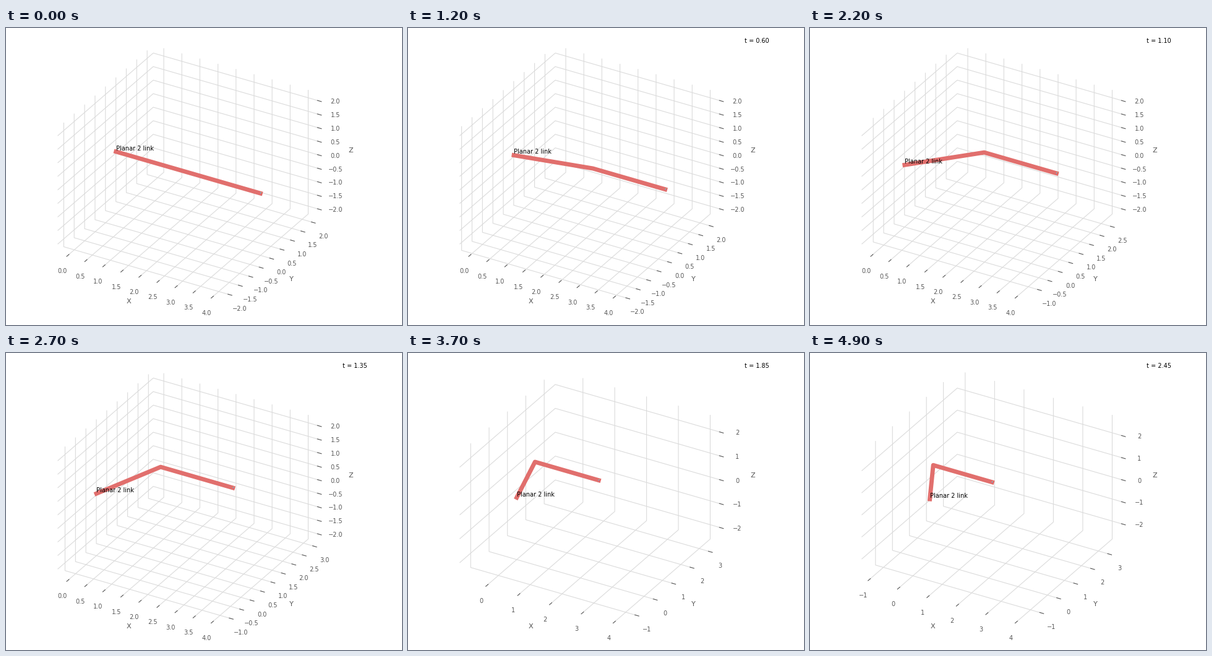
A matplotlib script for the animation above (5000 ms loop, 640 px wide and 480 px high).

```python
import math

import matplotlib.pyplot as plt
import numpy as np
from matplotlib.animation import FuncAnimation
from matplotlib.collections import LineCollection

W, H, DPI = 640, 480, 100
FRAMES, INTERVAL = 50, 100
LINK = 2.0               # length of each arm segment
FINAL_ANGLE = 2.044      # shoulder angle at the end, radians
GREY, GRID, ARM = "#555555", "#dbdbdb", "#E16F6D"

CENTRE = np.array([294.49, 233.51])
CUBE = 296.53            # pixels spanned by one full axis range
EDGE = 0.5 * 25 / 24     # panes reach slightly past the limits
# Orthographic view, elevation 30 and azimuth -60; z is squeezed to 3/4.
VIEW = CUBE * np.array([
    [math.sqrt(3) / 2, 0.25],
    [0.5, -math.sqrt(3) / 4],
    [0, -0.75 * math.sqrt(3) / 2],
])

# For each axis: the edge holding its ticks, the tick direction, and the grid path.
EDGES = np.array([[0, -1, -1], [1, 0, -1], [1, 1, 0]])
TICK_DIRS = np.array([[0, -1, 0], [1, 0, 0], [1, 0, 0]])
GRID_PATHS = np.array([
    [[0, -1, -1], [0, 1, -1], [0, 1, 1]],
    [[1, 0, -1], [-1, 0, -1], [-1, 0, 1]],
    [[-1, -1, 0], [-1, 1, 0], [1, 1, 0]],
])
TICK_PAD = 11.5 * 48 / 691.2 / 12
LABEL_PAD = 22 * 48 / 691.2 / 12

plt.rcParams["font.family"] = "DejaVu Sans"
fig = plt.figure(figsize=(W / DPI, H / DPI), dpi=DPI, facecolor="white")
ax = fig.add_axes([0, 0, 1, 1])


def project(points):
    """Map points in units of the axis range, centred on the box, to pixels."""
    return CENTRE + np.asarray(points, dtype=float) @ VIEW


def shoulder_angle(frame):
    t = frame / (FRAMES - 1)
    return FINAL_ANGLE * t**3 * (10 - 15 * t + 6 * t * t)


def view_box(angle):
    """Centre and range of the limits around everything swept so far."""
    x_min = LINK * min(0.0, math.cos(angle))
    y_max = LINK * math.sin(min(angle, math.pi / 2))
    x_max = 2 * LINK
    middle = np.array([(x_min + x_max) / 2, y_max / 2, 0.0])
    return middle, 1.1 * (x_max - x_min)


def tick_values(middle, span):
    step = 0.5 if span <= 4.5 else 1
    first = math.ceil((middle - span / 2) / step)
    last = math.floor((middle + span / 2) / step)
    digits = 1 if step < 1 else 0
    for k in range(first, last + 1):
        yield k * step, f"{k * step:.{digits}f}".replace("-", "\u2212")


def draw_axis(index, middle, span):
    edge = EDGES[index]
    along = np.eye(3)[index]
    grid_lines = []
    for value, text in tick_values(middle[index], span):
        offset = along * (value - middle[index]) / span
        grid_lines.append(project(GRID_PATHS[index] * EDGE + offset))
        base = edge * EDGE + offset
        tick = project([base - TICK_DIRS[index] * 0.1 / 12,
                        base + TICK_DIRS[index] * 0.2 / 12])
        ax.plot(*tick.T, color=GREY, lw=0.8, zorder=2)
        ax.text(*project(base + edge * TICK_PAD), text, color=GREY,
                size=7, ha="center", va="top")
    ax.add_collection(LineCollection(grid_lines, colors=GRID, linewidths=0.8,
                                     zorder=1), autolim=False)
    ax.text(*project(edge * (EDGE + LABEL_PAD)), "XYZ"[index], color=GREY,
            size=8, ha="center", va="center")


def draw_arm(angle, middle, span):
    def place(points):
        return project((np.asarray(points) - middle) / span)

    elbow = LINK * np.array([math.cos(angle), math.sin(angle), 0])
    tip = elbow + [LINK, 0, 0]
    ax.plot(*place([[0, 0, 0], elbow, tip]).T, color=ARM, lw=5, zorder=3)
    for direction, color in zip(np.eye(3), ("#F84752", "#BADA55", "#54AEFF")):
        ax.plot(*place([tip, tip + 0.05 * direction]).T, color=color, lw=0.8,
                solid_capstyle="butt", zorder=4)
    ax.text(*place([0, 0, 0.05]), "Planar 2 link", color="black", size=7,
            ha="left", va="baseline", zorder=5)


def update(frame):
    ax.clear()
    ax.set_axis_off()
    ax.set_autoscale_on(False)
    ax.set(xlim=(0, W), ylim=(H, 0))
    angle = shoulder_angle(frame)
    middle, span = view_box(angle)
    for index in range(3):
        draw_axis(index, middle, span)
    draw_arm(angle, middle, span)
    if frame:
        ax.text(0.85 * W, 0.05 * H, f"t = {frame * 0.05:.2f}", color="black",
                size=7, ha="left", va="baseline")
    return []


animation = FuncAnimation(fig, update, frames=FRAMES, interval=INTERVAL,
                          init_func=lambda: update(0), repeat=True,
                          repeat_delay=0)
plt.show()
```
